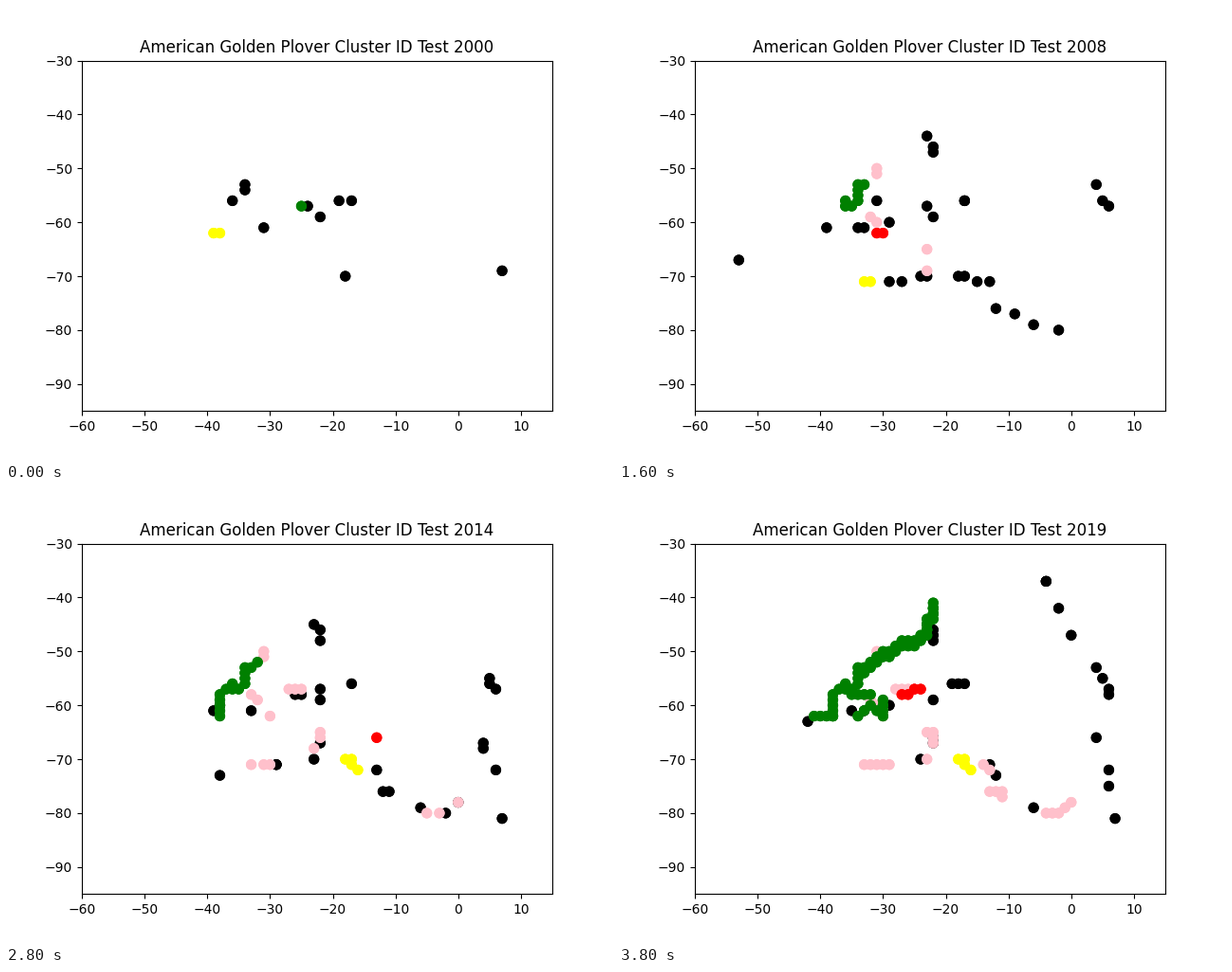
Recreate the animation shown at these times as a matplotlib script. Size 640 by 480 pixels, loop 4000 ms.

```python
import random

import matplotlib.pyplot as plt
import numpy as np
from matplotlib.animation import FuncAnimation

START, YEARS = 2000, 20


def walk(*keys):
    """Whole-degree sites along a path through the key points."""
    pts = []
    for (x0, y0), (x1, y1) in zip(keys, keys[1:] or keys):
        n = max(abs(x1 - x0), abs(y1 - y0), 1)
        pts += [(round(x0 + (x1 - x0) * k / n), round(y0 + (y1 - y0) * k / n))
                for k in range(n + 1)]
    return list(dict.fromkeys(pts))


RIDGE = walk((-38, -62), (-38, -58), (-37, -57), (-36, -57), (-36, -56),
             (-35, -57), (-34, -56), (-34, -53), (-33, -53), (-30, -50),
             (-28, -49), (-27, -48), (-25, -48), (-23, -46), (-22, -41))
CORE = [(-36, -56), (-34, -54), (-34, -53)]
BRANCHES = (walk((-41, -62), (-38, -62)) + walk((-35, -58), (-32, -58))
            + walk((-34, -62), (-32, -60), (-30, -62), (-30, -59)))

# Groups that settle somewhere new from a given year on.
YELLOW = {2000: walk((-39, -62), (-38, -62)),
          2003: walk((-16, -67), (-18, -67), (-18, -70)),
          2007: walk((-33, -71), (-32, -71)),
          2011: walk((-12, -76), (-11, -76), (-11, -77)),
          2013: walk((-18, -70), (-17, -70), (-17, -71), (-16, -72))}
RED = {2000: [],
       2003: walk((-37, -57), (-36, -56)),
       2007: walk((-31, -62), (-30, -62)),
       2011: walk((-33, -70), (-33, -71), (-32, -71)),
       2013: walk((-13, -66)),
       2019: walk((-27, -58), (-26, -58), (-25, -57), (-24, -57))}

# Flight lines: first year, then the sites that can be visited.
BLACK_LINES = [
    (2000, walk((-31, -61), (-27, -58), (-22, -57), (-17, -56))),
    (2003, walk((-18, -70), (-13, -71), (-11, -76), (-6, -79), (-2, -80))),
    (2004, walk((-45, -66), (-38, -60), (-33, -61))),
    (2006, walk((-29, -71), (-23, -70), (-22, -65))),
    (2008, walk((-23, -44), (-22, -48))),
    (2008, walk((4, -52), (6, -58))),
    (2012, walk((3, -65), (6, -71), (6, -77), (4, -75))),
    (2015, walk((-4, -37), (-3, -40), (0, -47))),
]
PINK_LINES = [
    (2003, walk((-31, -50), (-31, -51))),
    (2003, walk((-33, -58), (-30, -61), (-30, -62))),
    (2007, walk((-24, -65), (-22, -65), (-23, -70))),
    (2012, walk((-28, -57), (-25, -57))),
    (2013, walk((-33, -71), (-29, -71))),
    (2013, walk((-5, -80), (-2, -80), (0, -78))),
    (2015, walk((-13, -76), (-11, -76), (-11, -77))),
    (2016, walk((-14, -71), (-13, -72))),
]

# Regular stops: site, first and last year.
HOMES = [((-22, -59), 2000, 2019), ((-17, -56), 2000, 2019),
         ((-18, -70), 2000, 2010), ((-12, -69), 2003, 2005),
         ((-13, -71), 2003, 2008), ((-31, -56), 2004, 2012),
         ((-29, -71), 2004, 2014), ((-2, -80), 2004, 2009),
         ((-6, -79), 2004, 2017), ((-12, -76), 2007, 2014),
         ((0, -78), 2010, 2017), ((-38, -73), 2011, 2014),
         ((-4, -37), 2016, 2019), ((6, -58), 2016, 2019)]

# Rare far-off sightings.
FAR = {(7, -69): (2000, 2006), (7, -81): (2014, 2016, 2019),
       (-53, -67): (2005, 2008, 2012, 2013, 2016, 2018),
       (0, -89): (2007, 2012, 2015)}


def current(eras, year):
    return eras[max(y for y in eras if y <= year)]


def visits(lines, year, count, rng):
    pts = []
    for since, line in lines:
        if year >= since:
            pts += rng.sample(line, min(count, len(line)))
    return pts


def colony(year):
    """Green sites, and the ridge still ahead of them."""
    if year < 2007:
        return [(-25, -57)], []
    low = np.interp(year, [2008, 2014], [-36, -38])
    high = np.interp(year, [2012, 2016, 2019], [-33, -30, -22])
    ridge = list(RIDGE)
    if year >= 2016:
        ridge += [(x, y - 1) for x, y in RIDGE if x > -34]
    green = [p for p in ridge if low <= p[0] <= high]
    if year >= 2018:
        green += BRANCHES
    return green, [p for p in ridge if p[0] > high]


def groups(year):
    rng = random.Random(year)
    green, ahead = colony(year)
    black = visits(BLACK_LINES, year, 3, rng)
    black += [p for p, first, last in HOMES if first <= year <= last]
    black += [p for p, seen in FAR.items() if year in seen]
    if year < 2007:
        black += CORE
    pink = visits(PINK_LINES, year, 2 + max(0, year - 2012) // 2, rng)
    red = ahead if 2016 <= year < 2019 else current(RED, year)
    return {"black": black, "pink": pink, "yellow": current(YELLOW, year),
            "red": red, "green": green}


fig, ax = plt.subplots(figsize=(6.4, 4.8), dpi=100)
ax.set_xlim(-60, 15)
ax.set_ylim(-95, -30)
title = ax.set_title("")
birds = ax.scatter([], [], s=50)


def update(i):
    year = START + i
    # Each site is drawn twice, as sightings pile up there.
    marks = [(p, color) for color, pts in groups(year).items()
             for p in pts * 2]
    birds.set_offsets([p for p, _ in marks])
    birds.set_color([color for _, color in marks])
    title.set_text(f"American Golden Plover Cluster ID Test {year}")
    return birds, title


anim = FuncAnimation(fig, update, frames=YEARS, interval=200, repeat=True,
                     repeat_delay=0)
plt.show()
```
